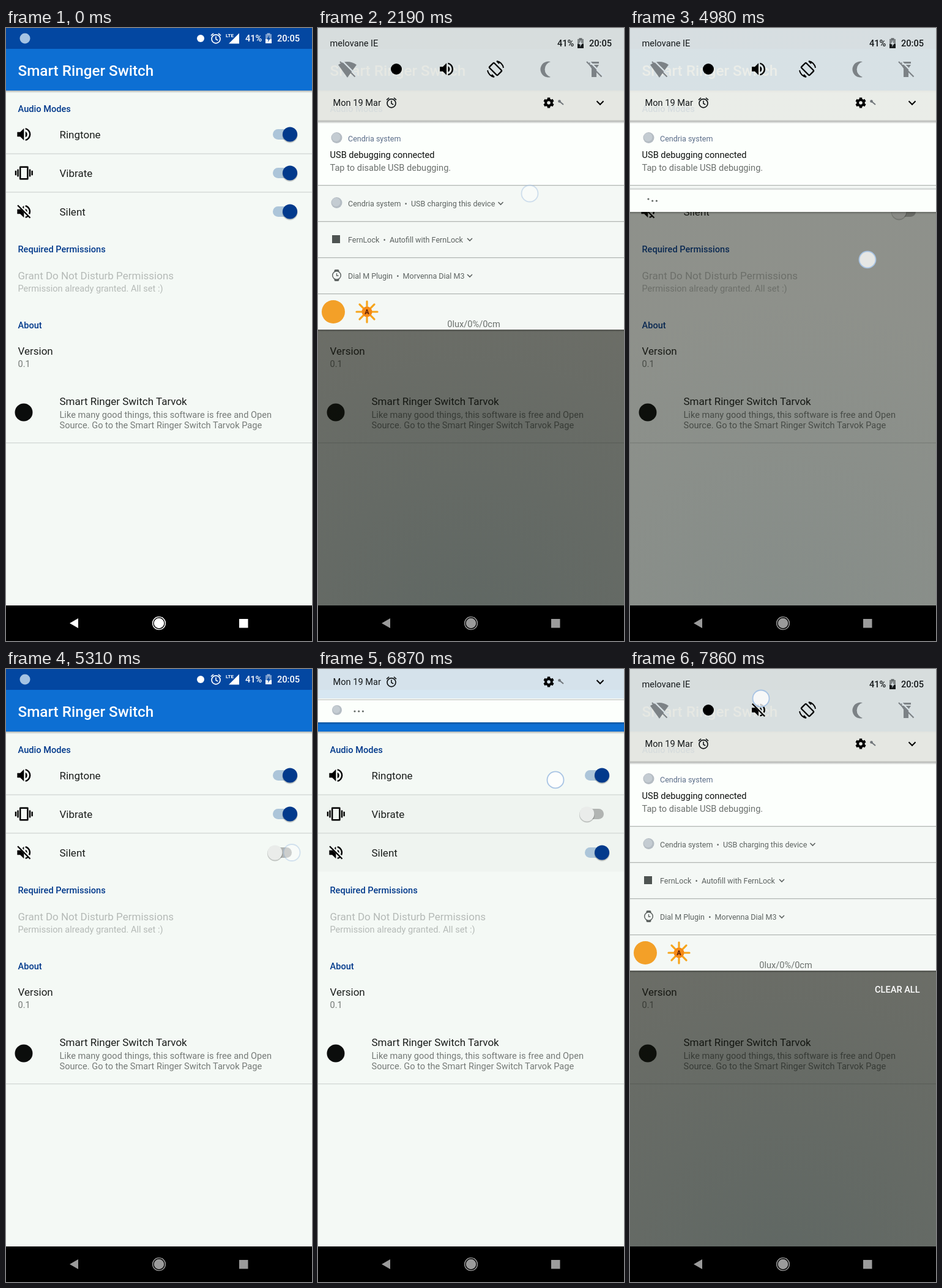
Animation of 500 by 1000 pixels, one loop 8 s. Source, as an HTML page:

```html
<!DOCTYPE html>
<html lang="en">
<head>
<meta charset="utf-8">
<title>Smart Ringer Switch</title>
<style>
  html, body { margin: 0; width: 100%; height: 100%; overflow: hidden; background: #000; }
  svg { display: block; width: 500px; height: 1000px; font-family: Roboto, sans-serif; }
  text { white-space: pre; }
</style>
</head>
<body>
<svg id="stage" viewBox="0 0 500 1000"></svg>
<script>
const LOOP = 8000;
const STEP = 30;    // screen refresh in ms
const FULL = 492;   // height of the open shade
const SHELF = 36;

// ---- drawing helpers ----
const text = (x, cy, size, fill, str, weight = 400, extra = '') =>
  `<text x="${x}" y="${cy + size * 0.36}" font-size="${size}" fill="${fill}" font-weight="${weight}" ${extra}>${str}</text>`;
const rect = (x, y, w, h, fill, extra = '') =>
  `<rect x="${x}" y="${y}" width="${w}" height="${h}" fill="${fill}" ${extra}/>`;
const circle = (x, y, r, fill, extra = '') =>
  `<circle cx="${x}" cy="${y}" r="${r}" fill="${fill}" ${extra}/>`;
const line = (d, color, width, extra = '') =>
  `<path d="${d}" fill="none" stroke="${color}" stroke-width="${width}" ${extra}/>`;
const group = (id, body, extra = '') => `<g id="${id}" ${extra}>${body}</g>`;
const at = (x, y, body) => `<g transform="translate(${x} ${y})">${body}</g>`;

const SPEAKER = 'M3 9v6h4l5 5V4L7 9z';
const glyphs = {
  ring: `<path d="${SPEAKER}M14 8a4.5 4.5 0 0 1 0 8z"/>` +
    line('M14 4.3a7.9 7.9 0 0 1 0 15.4', '#000', 2),
  vibrate: line('M1 9v6M4 7v10M20 7v10M23 9v6M7 4h10v16H7z', '#000', 2, 'stroke-linejoin="round"'),
  mute: `<path d="M3 9h4.7L12 13.3V20l-5-5H3zM12 4v4.2L9.9 6.1zM14 8a4.5 4.5 0 0 1 2.4 4.6L14 10.2z"/>` +
    line('M14 4.3a7.9 7.9 0 0 1 5.2 11M14 19.7a8 8 0 0 0 3-1.5M3.6 3.6l16.8 16.8', '#000', 1.9)
};
const glyph = (name, x, y) =>
  `<g transform="translate(${x} ${y}) scale(1.215) translate(-12 -12)">${glyphs[name]}</g>`;

const alarm = (x, y, r, c) => at(x, y,
  circle(0, 0.8, r, 'none', `stroke="${c}" stroke-width="1.7"`) +
  line(`M0 -3.5V1.2L3.2 3M${-r - 1} ${-r + 2.4}l4 -3.6M${r + 1} ${-r + 2.4}l-4 -3.6`, c, 1.6));

const battery = (y, c, bolt) => at(429, y,
  rect(-5, -7, 10, 15, c, 'opacity=".45"') + rect(-2.5, -8.5, 5, 2, c, 'opacity=".6"') +
  rect(-5, 1, 10, 7, c) + `<path d="M1 -5L-3 1.5H-.3L-1 6L3 -.5H.5z" fill="${bolt}"/>`);

const clock = (y, c, bolt) =>
  text(391, y, 14.6, c, '41%', 500) + battery(y, c, bolt) + text(443, y, 14.6, c, '20:05', 500);

const ball = (x, y, r = 9) => circle(x, y, r, '#b4bcc3') + circle(x - 1, y - 1, r - 2, '#c4ccd2');
const chevron = (x, y, s, c, w) => line(`M${x - s} ${y - s / 2}l${s} ${s}l${s} ${-s}`, c, w);

// ---- settings page ----
const INK = '#1b1e1c', SOFT = '#757a77', BLUE = '#023a8c', BG = '#f4f9f5';
const ROWS = [['Ringtone', 'ring', 173.5], ['Vibrate', 'vibrate', 236.5], ['Silent', 'mute', 299.5]];

const row = ([name, icon, y], i) =>
  rect(0, y - 31, 500, 62, '#000', `id="press${i}" opacity="0"`) +
  glyph(icon, 29.3, y) + text(87.5, y + 0.5, 17, INK, name) +
  rect(436, y - 8.5, 31, 17, '#b1b4b2', `rx="8.5" id="track${i}"`) +
  circle(464, y + 1.3, 12.6, '#000', `opacity=".2" id="shade${i}"`) +
  circle(464, y, 12, BLUE, `id="thumb${i}"`);

const heading = (y, str) => text(19.5, y, 14.6, BLUE, str, 500);
const rule = y => rect(0, y, 500, 1.5, '#d6dbd8');

const status =
  circle(31, 17, 8.5, '#a5c3e3') +
  circle(318, 17, 6, '#fff') + alarm(343, 17, 7, '#fff') +
  '<path d="M364 25.5H381V8.5z" fill="#fff"/>' + rect(358, 8, 13, 9, '#0347a1') +
  text(359, 12.5, 8, '#fff', 'LTE', 700) + clock(17, '#fff', '#0347a1');

const page =
  rect(0, 0, 500, 942, BG) + rect(0, 102, 500, 4, 'url(#drop)') +
  rect(0, 0, 500, 34, '#0347a1') + rect(0, 34, 500, 68, '#0d6fd3') + group('status', status) +
  text(19.5, 69, 24.3, '#fff', 'Smart Ringer Switch', 500) +
  heading(132, 'Audio Modes') + ROWS.map(row).join('') + rule(204.5) + rule(267) +
  heading(361, 'Required Permissions') +
  text(19.5, 403.5, 17, '#b5bab7', 'Grant Do Not Disturb Permissions') +
  text(19.5, 425, 14.6, '#b5bab7', 'Permission already granted. All set :)') +
  heading(484.5, 'About') + text(19.5, 526.5, 17, INK, 'Version') + text(19.5, 548, 14.6, SOFT, '0.1') +
  circle(29, 627, 14.5, '#0b0d0c') + text(87.5, 609, 17, INK, 'Smart Ringer Switch Tarvok') +
  text(87.5, 630.5, 14.6, SOFT, 'Like many good things, this software is free and Open') +
  text(87.5, 647.5, 14.6, SOFT, 'Source. Go to the Smart Ringer Switch Tarvok Page') + rule(676);

// ---- notification shade ----
const OFF = '#7c8286', TILE = '#d8e1e6';
const slash = (x, y) =>
  line(`M${x - 9} ${y - 14}l25 25`, TILE, 2.4) + line(`M${x - 12} ${y - 12}l24.5 24.5`, OFF, 2.2);

const tiles =
  `<path d="M48 81L33 60Q48 50 63 60z" fill="${OFF}"/>` + slash(48, 67) +
  circle(128, 67, 9, '#000') +
  circle(210, 67, 44, '#000', 'id="ripple" opacity="0"') +
  Object.keys(glyphs).map(n => group('tile-' + n, glyph(n, 210, 67))).join('') +
  at(290, 67, rect(-5.5, -9.5, 11, 19, 'none', 'rx="1.5" stroke="#000" stroke-width="2.3" transform="rotate(-45)"') +
    line('M2 -13A13.2 13.2 0 0 1 13 -2M-2 13A13.2 13.2 0 0 1 -13 2M2 -13l4 4M-2 13l-4 -4', '#000', 1.9)) +
  `<path d="M380 55A13 13 0 1 0 380 80A13 13 0 0 1 380 55" fill="${OFF}"/>` +
  `<path d="M443 55h16v3h-16zM443 60h16l-4 6v14h-8V66z" fill="${OFF}"/>` + slash(451, 67);

const gear = at(377, 122,
  circle(0, 0, 4.8, 'none', 'stroke="#000" stroke-width="4"') +
  [0, 60, 120].map(a => line('M0 -8.6V-5M0 5V8.6', '#000', 4.4, `transform="rotate(${a})"`)).join(''));

const header =
  rect(0, 0, 500, 152, '#fbfdf8', 'opacity=".85"') +
  text(19.5, 25, 14.6, '#14181a', 'melovane IE') + clock(25, '#15191b', '#dce4e8') + tiles +
  text(24.5, 122, 14.6, '#14181a', 'Mon 19 Mar') + alarm(120, 122, 7, '#14181a') + gear +
  line('M395 120l6 5', '#70757a', 2) + circle(394.5, 119.5, 2.3, '#70757a') +
  chevron(461, 122, 5.5, '#000', 2) +
  rect(0, 150.5, 500, 1.5, '#000', 'opacity=".16"');

const GREY = '#5d6361';
const slim = (y, icon, str, tip) =>
  rect(0, y - 29, 500, 59, '#f4f8f5') + rect(0, y - 30, 500, 1.3, '#b3b8b5') +
  icon + text(49, y, 12.5, GREY, str) + chevron(tip, y, 4, GREY, 1.6);

const watch = rect(26.5, 394, 8, 19, GREY, 'rx="2"') +
  circle(30.5, 403.5, 6.8, '#f4f8f5', `stroke="${GREY}" stroke-width="1.5"`) +
  line('M30.5 400v4h3', GREY, 1.3);

const rays = Array.from({ length: 8 }, (_, i) =>
  line('M0 -8V-17', '#f7a51c', 3.2, `transform="rotate(${i * 45})" stroke-linecap="round"`)).join('');

const list =
  rect(0, 152, 500, 105, '#fcfffc') + rect(0, 152, 500, 4, 'url(#drop)') +
  ball(30.5, 179) + text(49, 180, 12.5, '#5b6d89', 'Cendria system') +
  text(19.5, 207, 14.6, '#0e100f', 'USB debugging connected') +
  text(19.5, 227.5, 14.6, '#6c716e', 'Tap to disable USB debugging.') +
  slim(286, ball(30.5, 285), 'Cendria system  •  USB charging this device', 298.5) +
  slim(345, rect(23, 338, 13, 13, '#4e5452'), 'FernLock  •  Autofill with FernLock', 248) +
  slim(404, watch, 'Dial M Plugin  •  Morvenna Dial M3', 248) +
  rect(0, 433, 500, 59, '#f4f8f5') + rect(0, 433, 500, 1.3, '#b3b8b5') +
  circle(25, 463, 19, '#f3a028') +
  at(80, 463, rays + circle(0, 0, 8.5, '#f58a17') + text(0, 0, 11, '#5a1c08', 'A', 700, 'text-anchor="middle"')) +
  text(254.5, 482.5, 14.6, '#6c716e', '0lux/0%/0cm', 400, 'text-anchor="middle"');

const dots = (x, lift) => [0, 6.7, 13.4].map((d, i) =>
  circle(x + d, 18 - (i ? 0 : lift), 1.6, '#646a67')).join('');
const shelf = rect(0, -3, 500, 3, '#d9dddb') + rect(0, 0, 500, SHELF, '#fcfffc') +
  group('shelfLow', ball(31, 16, 8) + dots(60, 0)) + group('shelfHigh', dots(30, 3));

const shadeView =
  group('list', list, 'clip-path="url(#listClip)"') + group('shelf', shelf) +
  group('header', header);

// ---- navigation bar and touch dot ----
const NAV = 'currentColor';
const nav = rect(0, 942, 500, 58, '#000') + group('nav',
  `<path d="M104 971L118 963V979z" fill="${NAV}"/>` + circle(250, 971, 8.3, NAV) +
  circle(250, 971, 10.4, 'none', `stroke="${NAV}" stroke-width="1.4"`) +
  rect(381, 964, 14.5, 14.5, NAV));

const finger = group('touch', circle(0, 0, 13.5, '#fff', 'fill-opacity=".78" stroke="#a8c4e4" stroke-width="1.8"'));

const stage = document.getElementById('stage');
stage.innerHTML = `<defs>
  <linearGradient id="drop" x1="0" y1="0" x2="0" y2="1">
    <stop offset="0" stop-opacity=".28"/><stop offset="1" stop-opacity="0"/></linearGradient>
  <radialGradient id="dim" gradientUnits="userSpaceOnUse" cx="250" cy="1000" r="560">
    <stop offset="0" stop-color="#000a06"/><stop offset="1" stop-color="#14140c"/></radialGradient>
  <clipPath id="shadeClip"><rect id="shadeBox" width="500" height="0"/></clipPath>
  <clipPath id="listClip"><rect id="listBox" y="152" width="500" height="0"/></clipPath>
  </defs>` + page + rect(0, 0, 500, 942, 'url(#dim)', 'id="scrim"') +
  text(400, 522.5, 14.6, '#fff', 'CLEAR ALL', 500, 'id="clear"') +
  `<g id="shadeView"><g clip-path="url(#shadeClip)">${shadeView}</g>` +
  rect(0, 0, 500, 4, 'url(#drop)', 'id="edge"') + '</g>' + nav + finger;

// ---- motion ----
const $ = id => document.getElementById(id);
const set = (id, name, value) => $(id).setAttribute(name, value);
const clamp = v => Math.max(0, Math.min(1, v));
const ramp = (t, a, b) => clamp((t - a) / (b - a));
const smooth = v => v * v * (3 - 2 * v);
const mix = (a, b, k) => a + (b - a) * k;
const tint = (from, to, k) => `rgb(${from.map((c, i) => Math.round(mix(c, to[i], k)))})`;

function track(t, keys) {
  if (t <= keys[0][0]) return keys[0][1];
  for (let i = 1; i < keys.length; i++) {
    const [t0, a] = keys[i - 1], [t1, b] = keys[i];
    if (t < t1) return mix(a, b, (t - t0) / (t1 - t0));
  }
  return keys[keys.length - 1][1];
}

const HEIGHT = [[2085, 0], [2130, 90], [2160, 330], [2190, FULL], [4820, FULL], [4890, 470], [4980, 300],
  [5070, 70], [5150, 0], [6765, 0], [6810, 25], [6870, 87], [6960, 300], [7050, 460], [7110, FULL]];

// start, end, x, y at the start, y at the end, optional opacity track
const TOUCHES = [
  [990, 1230, 467, 299.5, 299.5],
  [2100, 2200, 346, 0, 300, [[2150, 1], [2190, .5]]],
  [3240, 3480, 228, 67, 67],
  [3985, 4200, 228, 67, 67],
  [4830, 5040, 388, 560, 305],
  [5300, 5760, 467, 299.5, 299.5, [[5300, .45], [5639, .45], [5670, 1]]],
  [6030, 6240, 467, 236.5, 236.5],
  [6780, 7020, 388, 20, 449],
  [7290, 7500, 214, 48, 48],
  [7855, 8200, 214, 48, 48]
];
const TAPS = [3270, 4020, 7320];

function drawSwitch(i, on, press) {
  const x = mix(439.5, 464, smooth(on));
  set('thumb' + i, 'cx', x);
  set('shade' + i, 'cx', x);
  set('thumb' + i, 'fill', tint([234, 236, 234], [2, 58, 140], on));
  set('track' + i, 'fill', tint([177, 180, 178], [172, 197, 217], on));
  set('press' + i, 'opacity', press);
}

function drawShade(t) {
  const h = track(t, HEIGHT), shift = Math.min(0, h - 188);
  const folded = 1 - ramp(h, 430, 485);
  const slide = `translate(0 ${shift})`;
  set('shadeView', 'visibility', h > 0 ? 'visible' : 'hidden');
  set('status', 'visibility', h > 0 ? 'hidden' : 'visible');
  set('shadeBox', 'height', h);
  set('listBox', 'height', Math.max(0, h - SHELF * folded - 152 - shift));
  set('list', 'transform', slide);
  set('header', 'transform', slide);
  set('shelf', 'transform', `translate(0 ${h - SHELF})`);
  set('shelf', 'opacity', folded);
  set('shelfLow', 'opacity', h < 190 ? 1 : 0);
  set('shelfHigh', 'opacity', h < 190 ? 0 : 1);
  set('edge', 'y', h);
  set('scrim', 'opacity', 0.61 * ramp(h, 95, 370));
  set('clear', 'opacity', track(t, [[2400, 0], [2700, 1], [4830, 1], [4920, 0], [7020, 0], [7140, 1]]));

  const mode = t >= 7380 ? 'mute' : t >= 3360 && t < 4110 ? 'vibrate' : 'ring';
  for (const n in glyphs) set('tile-' + n, 'visibility', n === mode ? 'inherit' : 'hidden');

  const tap = TAPS.find(s => t >= s && t < s + 420);
  const k = tap ? (t - tap) / 420 : 0;
  set('ripple', 'r', 20 + 24 * Math.sqrt(k));
  set('ripple', 'opacity', tap ? 0.08 * (1 - k) : 0);
}

function drawTouch(t) {
  const hit = TOUCHES.find(([a, b]) => t >= a && t < b + 60);
  set('touch', 'visibility', hit ? 'visible' : 'hidden');
  if (!hit) return;
  const [a, b, x, y0, y1, fade = [[0, 1]]] = hit;
  set('touch', 'transform', `translate(${x} ${mix(y0, y1, ramp(t, a, b))})`);
  set('touch', 'opacity', track(t, fade) * (1 - ramp(t, b, b + 60)));
}

function draw(t) {
  drawSwitch(0, 1, 0);
  drawSwitch(1, 1 - ramp(t, 6120, 6300), track(t, [[6030, 0], [6120, .09], [6420, .02]]));
  drawSwitch(2, t < 5640 ? 1 - ramp(t, 1080, 1260) : ramp(t, 5690, 5870),
    track(t, [[990, 0], [1080, .09], [1320, .02], [1560, 0], [5640, 0], [5720, .09], [6000, .02]]));
  $('nav').style.color = tint([255, 255, 255], [155, 155, 155], ramp(t, 30, 600));
  drawShade(t);
  drawTouch(t);
}

const start = performance.now();
function tick() {
  const t = (performance.now() - start) % LOOP;
  draw(Math.floor(t / STEP) * STEP);
  requestAnimationFrame(tick);
}
draw(0);
tick();
</script>
</body>
</html>
```
